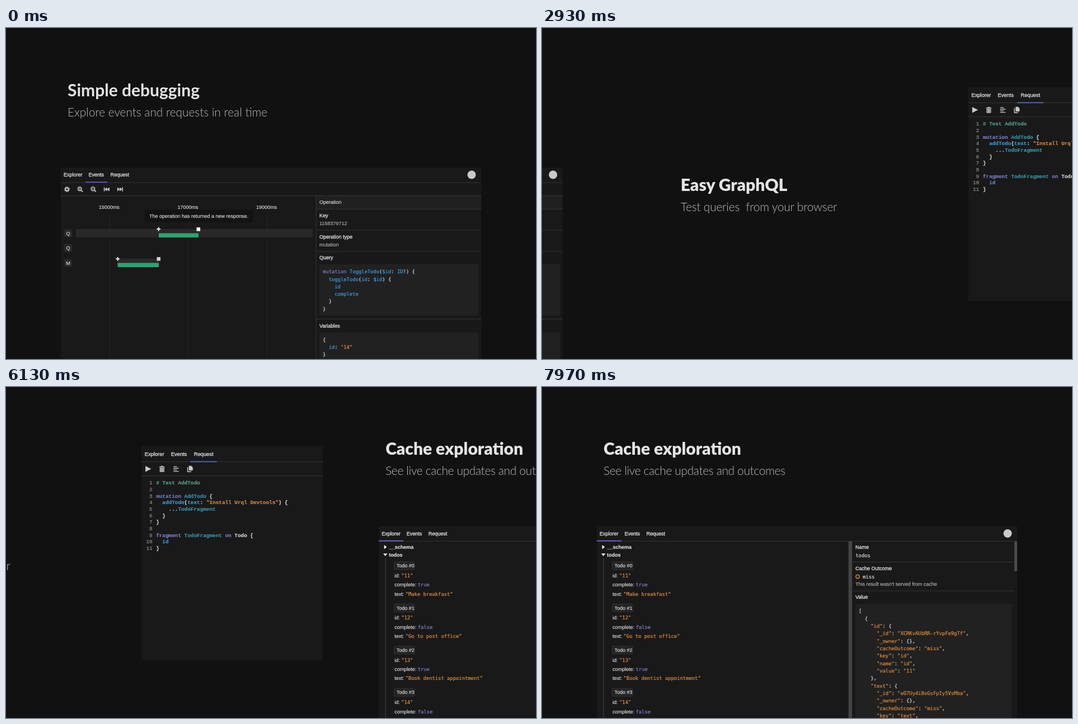
Animation of 947x591 px, one loop 8 s. Source, as an HTML page:

```html
<!DOCTYPE html>
<html lang="en">
<head>
<meta charset="utf-8">
<title>Devtools slides</title>
<style>
html, body { margin: 0; width: 100%; height: 100%; overflow: hidden; background: #111; }
svg { display: block; width: 947px; height: 591px; }
text, tspan { fill: currentColor; stroke: currentColor; }
text { white-space: pre; font: 9px "Liberation Sans", Arial, sans-serif; color: #e6e6e6; stroke-width: .12px; }
.title { font: 900 30px Lato, sans-serif; color: #e4e4e4; stroke-width: 0; }
.title.light { font-weight: 700; }
.sub { font: 300 20.8px Lato, sans-serif; color: #bcbcbc; stroke-width: 0; }
.tab, .head { stroke-width: .28px; }
.big { font-size: 9.4px; }
.bold { font-weight: 700; }
.dim { color: #b8b8b8; }
.m { font: 8.84px "DejaVu Sans Mono", monospace; stroke-width: .22px; }
.c { font: 700 9.36px "Liberation Mono", monospace; }
.num { font: 9.36px "Liberation Mono", monospace; color: #999; text-anchor: end; }
.mid { text-anchor: middle; }
.w { color: #dcdcdc; }
.p { color: #7f7fd0; }
.b { color: #389fe0; }
.t { color: #3a98ae; }
.g { color: #5a9f91; }
.o { color: #dc8c3e; }
</style>
</head>
<body>
<svg viewBox="0 0 947 591"><g id="events"></g><g id="request"></g><g id="explorer"></g></svg>
<script>
const LINE = '#343434', BLOCK = '#212121', ICON = '#c9c9c9';
const esc = s => s.replace(/&/g, '&amp;');

// "<cls>" inside a string switches the class of what follows
const spans = s => s.split(/<([\w ]+)>/).map((part, i, all) =>
  i % 2 ? '' : i ? `<tspan class="${all[i - 1]}">${esc(part)}</tspan>` : esc(part)).join('');
const text = (x, y, s, cls = '', more = '') =>
  `<text x="${x}" y="${y}" class="${cls}" ${more}>${spans(s)}</text>`;
const rect = (x, y, w, h, fill, more = '') =>
  `<rect x="${x}" y="${y}" width="${w}" height="${h}" fill="${fill}" ${more}/>`;
const path = (d, fill = ICON, more = '') => `<path d="${d}" fill="${fill}" ${more}/>`;
const stroke = (d, w = 1.4, color = ICON) => path(d, 'none', `stroke="${color}" stroke-width="${w}"`);
const ring = (x, y, r, w, color = ICON, more = '') =>
  `<circle cx="${x}" cy="${y}" r="${r}" fill="none" stroke="${color}" stroke-width="${w}" ${more}/>`;
const dot = (x, y, r, fill) => `<circle cx="${x}" cy="${y}" r="${r}" fill="${fill}"/>`;
const rule = (x, y, w) => rect(x, y, w, 1, LINE);
const lines = (x, y, pitch, list, cls) => list.map((s, i) => text(x, y + i * pitch, s, cls)).join('');
const heading = (y, title, sub, cls = '', tracking = 0) =>
  text(110, y, title, 'title ' + cls) +
  text(110, y + 35.5, sub, 'sub', tracking ? `letter-spacing="${tracking}"` : '');
const tabs = (xs, y, cls = '') =>
  ['Explorer', 'Events', 'Request'].map((s, i) => text(xs[i], y, s, 'tab ' + cls)).join('');

function zoom(x, y, plus) {
  return ring(x - .8, y - .8, 3.2, 1.5) + stroke(`M${x + 1.6} ${y + 1.6}l3 3`, 1.8) +
    stroke(`M${x - 2.5} ${y - .8}h3.4` + (plus ? `M${x - .8} ${y - 2.5}v3.4` : ''), .9);
}
function skip(x, y, dir) {
  const tri = a => `M${x + a * dir} ${y - 3.6}v7.2l${4.4 * dir} -3.6z`;
  return path(tri(-4.8) + tri(-.6)) + rect(x + (dir > 0 ? 3.6 : -5.2), y - 3.6, 1.6, 7.2, ICON);
}
const plus = (x, y) => stroke(`M${x - 3.4} ${y}h6.8M${x} ${y - 3.4}v6.8`, 2, '#e8e8e8');

function eventsSlide() {
  let s = heading(122, 'Simple debugging', 'Explore events and requests in real time', 'light');
  s += rect(98, 249, 751, 342, '#191919') + rule(98, 275.5, 751) + rule(98, 299, 751);
  s += tabs([103, 147.5, 186.5], 265.3) + rect(142, 274.3, 39, 1.9, '#5c56b4') + dot(832, 262, 7.5, ICON);

  s += ring(109, 288, 2.7, 2) + ring(109, 288, 4.2, 1.4, ICON, 'stroke-dasharray="1.7 1.6"');
  s += zoom(132.5, 288, true) + zoom(156.2, 288) + skip(180, 288, -1) + skip(203.7, 288, 1);

  for (let i = 0; i < 3; i++) {
    const x = 184.5 + i * 140.7;
    s += text(x - .3, 323.2, `${15 + 2 * i}000ms`, 'mid') + rect(x, 333, 1, 258, '#262626');
  }
  s += rect(125, 359, 423, 15, '#292929');
  ['Q', 'Q', 'M'].forEach((c, i) => {
    const y = 359.3 + i * 26.6;
    s += rect(103.8, y, 14.4, 14, '#292929', 'rx="2"') + text(111, y + 10.2, c, 'mid');
  });
  s += rect(248, 324.5, 192.5, 22.5, '#131313', 'rx="1"') +
    text(256, 338.8, 'The operation has returned a new response.');
  s += rect(273, 366.4, 71, 7.6, '#27a572') + plus(272.7, 359) + rect(340.5, 356, 6.6, 6.6, '#f4f4f4');
  s += rect(200, 412, 73, 7.5, '#292929') + rect(199.5, 419.4, 73.5, 7.6, '#27a572') +
    plus(199.6, 412.3) + rect(269.4, 409, 6.6, 6.6, '#cfcfcf');

  s += rect(554, 300, 295, 23, '#202020') + rect(553.5, 300, 1, 291, LINE);
  s += [323, 360.5, 398.5, 519].map(y => rule(554, y, 295)).join('');
  s += text(560, 314.2, 'Operation');
  s += text(560, 338, 'Key', 'head') + text(560, 352, '1158379712', 'dim');
  s += text(560, 375.6, 'Operation type', 'head') + text(560, 389.6, 'mutation', 'dim');
  s += text(560, 413.4, 'Query', 'head') + text(560, 534.6, 'Variables', 'head');
  s += rect(560, 422, 284.5, 91.5, BLOCK) + rect(560, 543.5, 284.5, 48, BLOCK);
  s += lines(566, 438.2, 13.3, [
    '<p>mutation <b>ToggleTodo<w>(<b>$id<w>: <b>ID<w>!) {',
    '  <b>toggleTodo<w>(<b>id<w>: <b>$id<w>) {',
    '    <b>id',
    '    <b>complete',
    '  }',
    '}'], 'm w');
  return s + lines(566, 559.6, 13.3, ['{', '  <b>id<w>: <o>"14"', '}'], 'm w');
}

function requestSlide() {
  let s = heading(291, 'Easy GraphQL', 'Test queries  from your browser', '', -.15);
  s += rect(624, 106, 324, 382, '#191919') + rule(624, 133, 324) + rule(624, 158, 324);
  s += tabs([629.5, 676.5, 717.5], 122.6, 'big') + rect(711, 132.4, 47.5, 1.9, '#5365b8');

  s += path('M631 141v10.6l10.4 -5.3z');
  s += rect(655.8, 142, 9.6, 1.5, ICON) + rect(659, 140.8, 3.2, 1.5, ICON) +
    path('M656.6 144.4h8v7.2h-8z') + stroke('M658.9 145.6v4.8M662.3 145.6v4.8', .8, '#191919');
  s += stroke('M681 142.2h6.4M681 145h9.6M681 147.8h6.4M681 150.6h9.6', 1.3);
  s += path('M708.6 140.8h4.2l2.8 2.8v5.4h-7z') + stroke('M706.4 143v8.2h6.6', 1.4);

  s += lines(650, 174.2, 11.68, [
    '<g># Test AddTodo',
    '',
    '<p>mutation <t>AddTodo <w>{',
    '  <b>addTodo<w>(<b>text<w>: <o>"Install Urql Devtools"<w>) {',
    '    ...<t>TodoFragment',
    '  }',
    '}',
    '',
    '<p>fragment <t>TodoFragment <p>on <w>Todo {',
    '  <b>id',
    '}'], 'c w');
  return s + lines(643.5, 174.2, 11.68, Array.from({ length: 11 }, (_, i) => `${i + 1}`), 'num');
}

function explorerSlide() {
  let s = heading(121, 'Cache exploration', 'See live cache updates and outcomes', '', -.3);
  s += rect(98, 248.5, 751, 343, '#191919') + rule(98, 274.8, 751);
  s += tabs([103, 147.5, 186.5], 264.8) + rect(98, 273.8, 44, 1.9, '#6a63c4') + dot(832, 261.5, 7.5, ICON);

  s += path('M107.5 282v7.6l4.8 -3.8z', '#eee') + path('M105.8 297.2h7.6l-3.8 4.8z', '#eee');
  s += text(116.5, 289, '__schema', 'bold') + text(116, 303, 'todos', 'bold');
  s += rect(109, 306, 2, 285, '#303030');
  const todos = ['Make breakfast', 'Go to post office', 'Book dentist appointment', ''];
  todos.forEach((todo, i) => {
    const y = 312 + i * 75.4;
    s += rect(125.5, y, 36.5, 14, '#242424', 'stroke="#363636" stroke-width=".8" rx="1"');
    s += text(129.5, y + 10.2, `Todo #${i}`);
    s += text(126, y + 28, `id: <o m>"${11 + i}"`);
    s += text(126, y + 44.3, `complete: <p m>${i % 2 === 0}`);
    if (todo) s += text(126, y + 60.6, `text: <o m>"${todo}"`);
  });

  s += rect(547.7, 275.8, 6.3, 316, '#444') + rect(844, 275.8, 5, 53, '#4a4a4a');
  s += rule(554, 312, 290) + rule(554, 363.5, 290);
  s += text(560, 289, 'Name', 'head') + text(560.3, 303.6, 'todos', 'm w');
  s += text(560, 326.7, 'Cache Outcome', 'head') + ring(564, 338.6, 3.2, 1.4, '#dc8c3e');
  s += text(573, 341.6, 'miss', 'm w') + text(560, 354.8, "This result wasn't served from cache", 'dim');
  s += text(560, 378.4, 'Value', 'head') + rect(560, 388, 279, 203, BLOCK);

  const pair = (key, value) => `      <o>"${key}"<w>: <o>"${value}"<w>,`;
  const field = (key, id) => [
    `    <o>"${key}"<w>: {`,
    pair('_id', id),
    '      <o>"_owner"<w>: {},',
    pair('cacheOutcome', 'miss'),
    pair('key', key)];
  return s + lines(566, 403.2, 13.34, ['[', '  {',
    ...field('id', 'XCRKvAUbRR-rYvpFe9gTf'),
    pair('name', 'id'),
    '      <o>"value"<w>: <o>"11"',
    '    },',
    ...field('text', 'eO7Uy4iBsGsFpIy5VsMba')], 'm w');
}

const slides = ['events', 'request', 'explorer'].map(id => document.getElementById(id));
[eventsSlide, requestSlide, explorerSlide].forEach((make, i) => { slides[i].innerHTML = make(); });

const LOOP = 8000, STEP = 100 / 3, PITCH = 950, STARTS = [2710, 6043], SPEED = 0.0153;

// critically damped spring from 0 to 1
function spring(ms) {
  const x = Math.max(0, ms) * SPEED;
  return 1 - (1 + x) * Math.exp(-x);
}
function draw(now) {
  const t = Math.floor((now % LOOP + 5) / STEP) * STEP;
  const at = STARTS.reduce((sum, start) => sum + spring(t - start), 0);
  slides.forEach((g, i) => g.setAttribute('transform', `translate(${((i - at) * PITCH).toFixed(2)} 0)`));
}
const begin = performance.now();
function tick() {
  draw(performance.now() - begin);
  requestAnimationFrame(tick);
}
tick();
</script>
</body>
</html>
```
